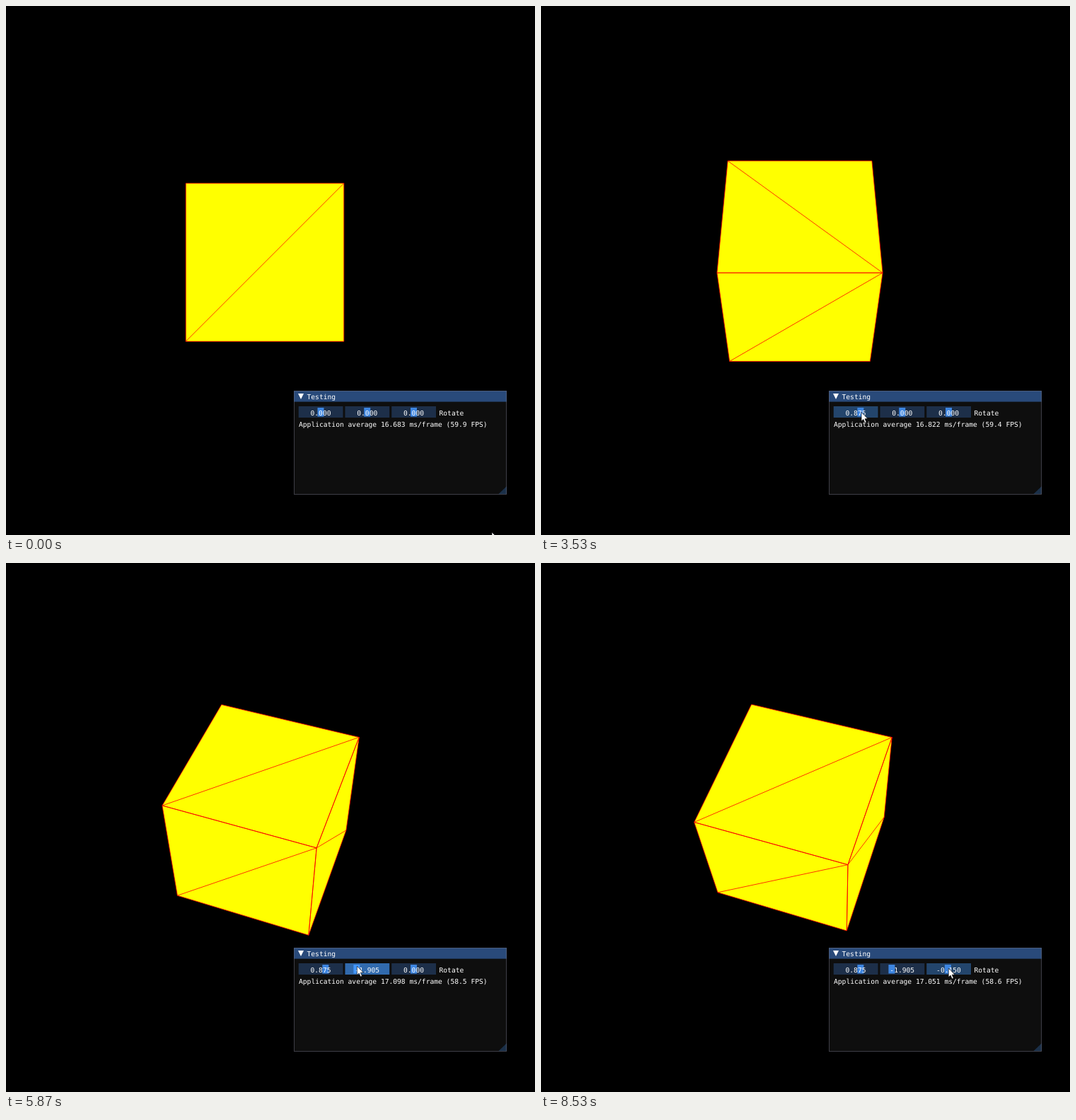
An HTML page with a canvas that plays this animation: 748x748 px, repeating every 8650 ms.

```html
<!DOCTYPE html>
<html lang="en">
<head>
<meta charset="utf-8">
<title>Rotating cube</title>
<style>
html, body { margin: 0; width: 100%; height: 100%; overflow: hidden; background: #000; }
canvas { display: block; }
</style>
</head>
<body>
<canvas id="stage" width="748" height="748"></canvas>
<script>
const ctx = document.getElementById('stage').getContext('2d');
const LOOP = 8650, STEP = 110.8, LAST = 77;

// Each slider is dragged from step `start` to `end`, easing between stops that lie `gap` steps apart.
const sliders = [
  { start: 9, end: 31, gap: 4, y: 574.5, stops: [0, .51, .36, 1, .875] },
  { start: 35, end: 53, gap: 4.5, y: 570, stops: [0, -1.1, -2.522, -2.4, -1.905] },
  { start: 59.5, end: 76, gap: 7.2, y: 573, stops: [0, -2.7, -.15] }
];
const frameTimes = [16.683, 16.82, 16.822, 16.82, 17.098, 16.964, 17.051];

// Corner bits 1, 2, 4 stand for +x, +y, +z; each face is split from its first to its third corner.
const faces = ['4576', '0231', '5137', '4620', '7326', '0154'];

function ease(from, to, u) {
  const k = Math.min(1, Math.max(0, u));
  return from + (to - from) * (1 - Math.cos(Math.PI * k)) / 2;
}

function valueAt({ start, gap, stops }, s) {
  const u = Math.min(stops.length - 1, Math.max(0, (s - start) / gap));
  const n = Math.min(stops.length - 2, Math.floor(u));
  return ease(stops[n], stops[n + 1], u - n);
}

const middle = i => 445 + 65.75 * i;

function turn(u, v, angle) {
  const c = Math.cos(angle), s = Math.sin(angle);
  return [u * c - v * s, u * s + v * c];
}

function project(corner, [a, b, c]) {
  let [x, y, z] = [1, 2, 4].map(bit => corner & bit ? 1 : -1);
  [x, y] = turn(x, y, c);
  [z, x] = turn(z, x, b);
  [y, z] = turn(y, z, a);
  const scale = 1006 / (10 - z);
  return [366 + x * scale, 362.5 - y * scale];
}

function path(points) {
  ctx.beginPath();
  points.forEach(p => ctx.lineTo(...p));
  ctx.closePath();
}

function shape(color, points) {
  path(points);
  ctx.fillStyle = color;
  ctx.fill();
}

function rect(color, x, y, w, h) {
  ctx.fillStyle = color;
  ctx.fillRect(x, y, w, h);
}

function label(text, x, y, align = 'left') {
  ctx.textAlign = align;
  ctx.fillStyle = '#fff';
  ctx.fillText(text, x, y);
}

function drawCube(angles) {
  const visible = faces
    .map(face => [...face].map(corner => project(corner, angles)))
    .filter(([p, q, r]) => (q[0] - p[0]) * (r[1] - p[1]) < (q[1] - p[1]) * (r[0] - p[0]));
  visible.forEach(face => shape('#ff0', face));
  ctx.strokeStyle = '#f00';
  ctx.lineWidth = .8;
  for (const face of visible) {
    path(face);
    ctx.moveTo(...face[0]);
    ctx.lineTo(...face[2]);
    ctx.stroke();
  }
}

function drawSlider({ start, end }, i, s, value) {
  const active = s >= start && s < end + 1;
  const hover = s >= start - 1 && s < end + 3;
  const x = middle(i);
  rect(active ? '#316aad' : hover ? '#23456c' : '#1d2f49', x - 31.3, 566, 62.8, 16);
  rect(active ? '#4296fa' : '#3d85e0', x - 4.5 + value * 7.8, 568, 9, 12.5);
  label(value.toFixed(3), x, 578.5, 'center');
}

function drawPanel(s, values) {
  rect('#0e0e0e', 407, 544, 301, 147);
  rect('#294a7a', 407, 544, 301, 15.6);
  shape('#1b3049', [[708, 679], [708, 690], [696.5, 690]]);
  ctx.strokeStyle = 'rgba(110,110,128,.5)';
  ctx.lineWidth = 1;
  ctx.strokeRect(407.5, 544.5, 300, 146);
  shape('#fff', [[413, 548], [421, 548], [417, 556]]);
  label('Testing', 425.5, 556);
  sliders.forEach((slider, i) => drawSlider(slider, i, s, values[i]));
  label('Rotate', 612.5, 578.5);
  const ms = frameTimes[Math.floor(s / 11.5)];
  label(`Application average ${ms.toFixed(3)} ms/frame (${(1000 / ms).toFixed(1)} FPS)`, 414, 595);
}

// The pointer follows the dragged slider and glides between drags.
function pointerAt(s, values) {
  let from = { x: 687, y: 744, leave: 0 };
  for (const [i, { start, end, y }] of sliders.entries()) {
    const x = middle(i) + 1 + 8.07 * values[i];
    if (s < start) {
      const u = (s - from.leave) / (start - from.leave);
      return { x: ease(from.x, x, u), y: ease(from.y, y, u), pressed: false };
    }
    if (s < end) return { x, y, pressed: true };
    from = { x, y, leave: end + 1 };
  }
  return { ...from, pressed: false };
}

function drawPointer({ x, y, pressed }) {
  const arrow = [[0, 0], [0, 12.5], [2.8, 10], [5, 15], [7, 14], [4.9, 9.3], [8.8, 9]];
  shape('#fff', arrow.map(([dx, dy]) => [x + dx, y + dy]));
  ctx.strokeStyle = '#000';
  ctx.lineWidth = .6;
  ctx.stroke();
  if (pressed) {
    ctx.beginPath();
    ctx.arc(x, y + .5, 10, 0, 7);
    ctx.fillStyle = 'rgba(255,255,0,.5)';
    ctx.fill();
  }
}

function draw(now) {
  const s = Math.min(LAST, Math.floor(now % LOOP / STEP + .25));
  const values = sliders.map(slider => valueAt(slider, s));
  rect('#000', 0, 0, 748, 748);
  ctx.font = '9.65px "DejaVu Sans Mono", monospace';
  ctx.textRendering = 'geometricPrecision';
  // The cube trails the sliders slightly.
  drawCube(sliders.map(slider => valueAt(slider, s - .25)));
  drawPanel(s, values);
  drawPointer(pointerAt(s, values));
}

const begin = performance.now();
(function tick() {
  draw(performance.now() - begin);
  requestAnimationFrame(tick);
})();
</script>
</body>
</html>
```
